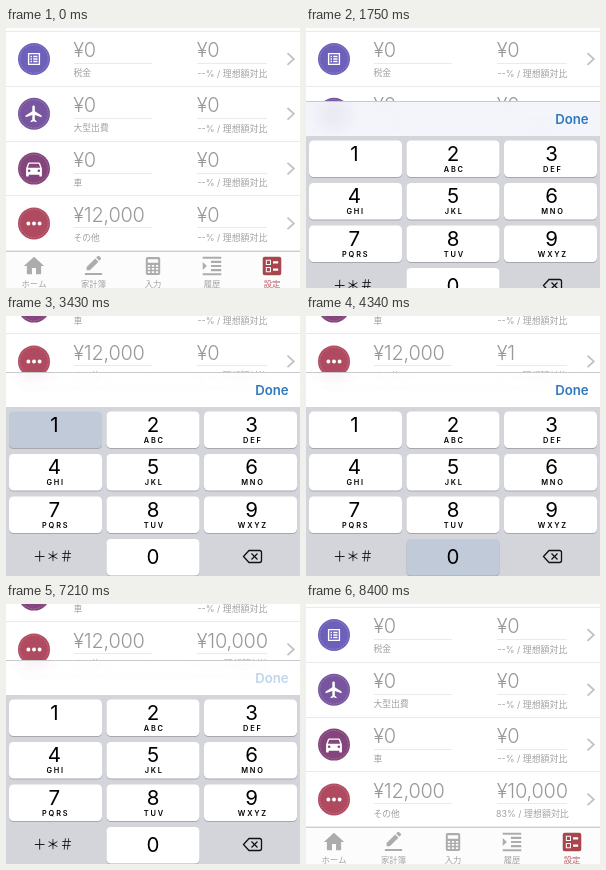
An HTML page with a canvas that plays this animation: 294x260 px, repeating every 9.24 s.

```html
<!DOCTYPE html>
<html lang="ja">
<head>
<meta charset="utf-8">
<title>Budget settings</title>
<style>
html, body { margin: 0; width: 100%; height: 100%; overflow: hidden; background: #fff; }
canvas { display: block; width: 294px; height: 260px; }
</style>
</head>
<body>
<canvas id="stage"></canvas>
<script>
const W = 294, H = 260, LOOP = 9240;
const PITCH = 54.8, SCROLL = 150, BAR_Y = 56, BAR_H = 35;
const SANS = 'Inter, "Noto Sans CJK JP", sans-serif';
const GREY = '#999', PALE = '#a2a2a2', RULE = '#eaeaea', RED = '#a8454d';

const canvas = document.getElementById('stage');
const dpr = window.devicePixelRatio || 1;
canvas.width = W * dpr;
canvas.height = H * dpr;
const ctx = canvas.getContext('2d');

// Glyphs on a 24-unit grid
const GLYPH = {
  list: 'M4 4h16v16H4zM5.8 5.8v12.4h12.4V5.8zM7.4 7.6h2v2h-2zM11 7.6h5.6v2H11zM7.4 11h2v2h-2zM11 11h5.6v2H11zM7.4 14.4h2v2h-2zM11 14.4h5.6v2H11z',
  plane: 'M21 16v-2l-8-5V3.5C13 2.67 12.33 2 11.5 2S10 2.67 10 3.5V9l-8 5v2l8-2.5V19l-2 1.5V22l3.5-1 3.5 1v-1.5L13 19v-5.5z',
  car: 'M18.9 6Q18.5 5 17.5 5h-11Q5.5 5 5.1 6L3 12v8q0 1 1 1h1q1 0 1-1v-1h12v1q0 1 1 1h1q1 0 1-1v-8zM5 14.5a1.5 1.5 0 1 0 3 0a1.5 1.5 0 1 0-3 0zM16 14.5a1.5 1.5 0 1 0 3 0a1.5 1.5 0 1 0-3 0zM5 11l1.5-4.5h11L19 11z',
  dots: 'M3.2 12a2.3 2.3 0 1 0 4.6 0a2.3 2.3 0 1 0-4.6 0zM9.7 12a2.3 2.3 0 1 0 4.6 0a2.3 2.3 0 1 0-4.6 0zM16.2 12a2.3 2.3 0 1 0 4.6 0a2.3 2.3 0 1 0-4.6 0z',
  home: 'M10 20v-6h4v6h5v-8h3L12 3 2 12h3v8z',
  pencil: 'M17.75 7L14 3.25l-10 10V17h3.75zM20.7 4q.7-.7 0-1.4L18.4.3q-.7-.7-1.4 0L15 2.25 18.75 6zM2 20h20v2.6H2z',
  calc: 'M6 2h12q2 0 2 2v16q0 2-2 2H6q-2 0-2-2V4q0-2 2-2zM6.2 4.4v4h11.6v-4z' +
    [10.8, 14.3, 17.8].map(y => [6.2, 10.7, 15.2].map(x => `M${x} ${y}h2.6v2h-2.6z`).join('')).join(''),
  indent: 'M3 21h18v-2H3zM3 8v8l4-4zM11 17h10v-2H11zM3 3v2h18V3zM11 9h10V7H11zM11 13h10v-2H11z',
  ballot: 'M13 9.5h5v-2h-5zM13 16.5h5v-2h-5zM19 21H5a2 2 0 0 1-2-2V5a2 2 0 0 1 2-2h14a2 2 0 0 1 2 2v14a2 2 0 0 1-2 2zM6 11h5V6H6zM7 7h3v3H7zM6 18h5v-5H6zM7 14h3v3H7z'
};
for (const k in GLYPH) GLYPH[k] = new Path2D(GLYPH[k]);

const ROWS = [
  { label: '税金', sum: '¥0', icon: 'list', size: 0.76, color: '#6d60ba' },
  { label: '大型出費', sum: '¥0', icon: 'plane', size: 0.84, color: '#78569f' },
  { label: '車', sum: '¥0', icon: 'car', size: 0.88, color: '#84457c' },
  { label: 'その他', sum: '¥12,000', icon: 'dots', size: 0.86, color: '#b04a60' }
];
const TABS = [
  ['ホーム', 'home', 28, 1.02], ['家計簿', 'pencil', 87.5, 0.86], ['入力', 'calc', 147, 0.9],
  ['履歴', 'indent', 206, 1.03], ['設定', 'ballot', 266, 1.03]
];
const LETTERS = ['', 'ABC', 'DEF', 'GHI', 'JKL', 'MNO', 'PQRS', 'TUV', 'WXYZ'];

// Typed amounts and key presses: [start, value] and [from, to, key]
const AMOUNTS = [[0, '¥0'], [3570, '¥1'], [4480, '¥10'], [4690, '¥100'], [4970, '¥1,000'], [5390, '¥10,000']];
const PRESSES = [[3430, 3570, 1], [4340, 4480, 0], [4550, 4970, 0], [5250, 5390, 0]];
const OPEN = 1493, CLOSE = 7268, DONE_DOWN = 6930;

const clamp = v => Math.max(0, Math.min(1, v));
const smooth = (t, a, b) => { const p = clamp((t - a) / (b - a)); return p * p * (3 - 2 * p); };
const spring = ms => { const x = Math.max(0, ms) * 0.016; return 1 - (1 + x) * Math.exp(-x); };

function text(str, x, y, size, color, { weight = 400, align = 'left', gap = 0 } = {}) {
  ctx.font = `${weight} ${size}px ${SANS}`;
  ctx.letterSpacing = gap + 'px';
  ctx.textAlign = align;
  ctx.fillStyle = color;
  ctx.fillText(str, x, y);
}

function rect(x, y, w, h, color) {
  ctx.fillStyle = color;
  ctx.fillRect(x, y, w, h);
}

function glyph(name, x, y, scale, color) {
  ctx.save();
  ctx.translate(x, y);
  ctx.scale(scale, scale);
  ctx.translate(-12, -12);
  ctx.fillStyle = color;
  ctx.fill(GLYPH[name], 'evenodd');
  ctx.restore();
}

function stroke(points, color, width) {
  ctx.beginPath();
  points.forEach(([x, y]) => ctx.lineTo(x, y));
  ctx.strokeStyle = color;
  ctx.lineWidth = width;
  ctx.stroke();
}

function badge(row, y) {
  ctx.beginPath();
  ctx.arc(28, y, 16, 0, 7);
  ctx.fillStyle = row.color;
  ctx.fill();
  ctx.beginPath();
  ctx.arc(28, y, 14.2, 0, 7);
  ctx.setLineDash([1.6, 1.1]);
  ctx.strokeStyle = 'rgba(255,255,255,.28)';
  ctx.lineWidth = 0.8;
  ctx.stroke();
  ctx.setLineDash([]);
  glyph(row.icon, 28, y, row.size, '#fff');
}

function drawList(t, scroll) {
  rect(0, Math.round(3 - scroll), W, 1, RULE);
  ROWS.forEach((row, i) => {
    const y = i * PITCH - scroll;
    const last = i === 3;
    const ideal = last ? AMOUNTS.filter(a => a[0] <= t).pop()[1] : '¥0';
    const filled = last && t >= DONE_DOWN;
    const sum = { weight: 300, gap: -0.25 };
    badge(row, y + 31);
    text(row.sum, 67.3, y + 29.3, 20, GREY, sum);
    text(ideal, 190.8, y + 29.3, 20, GREY, sum);
    const line = Math.round(y + 35);
    rect(68, line, 78, 1, RULE);
    rect(191, line, 70, 1, RULE);
    text(row.label, 67.5, y + 48.2, 8.8, PALE);
    text((filled ? '83' : '--') + '% / 理想額対比', filled ? 190 : 191.5, y + 48.8, 8.95, PALE);
    stroke([[281.5, y + 25.2], [287.8, y + 31], [281.5, y + 36.8]], '#c2c2c2', 1.8);
    rect(0, Math.round(y + 57.8), W, 1, RULE);
  });
}

function drawTabs() {
  rect(0, 223, W, 37, '#fcfcfc');
  rect(0, 223, W, 1, '#cfcfcf');
  TABS.forEach(([label, icon, x, scale], i) => {
    const on = i === 4;
    glyph(icon, x, 238, scale, on ? RED : '#acacac');
    text(label, x, 258.5, 8.3, on ? '#b8606a' : PALE, { align: 'center' });
  });
}

function key(x, y, color) {
  ctx.beginPath();
  ctx.roundRect(x, y + 1, 93, 36.5, 4.5);
  ctx.fillStyle = '#a6a8ae';
  ctx.fill();
  ctx.beginPath();
  ctx.roundRect(x, y, 93, 36.5, 4.5);
  ctx.fillStyle = color;
  ctx.fill();
}

function drawKeys(t) {
  const held = PRESSES.find(p => t >= p[0] && t < p[1]);
  const fill = n => held && held[2] === n ? '#c1cad9' : '#fff';
  const mid = { align: 'center' };
  rect(0, BAR_Y + BAR_H, W, H, '#d3d5db');
  LETTERS.forEach((letters, i) => {
    const col = i % 3, y = 95.5 + Math.floor(i / 3) * 42.5;
    const center = 48.4 + col * 98.6;
    key(3 + col * 97.5, y, fill(i + 1));
    text(String(i + 1), center, y + 20.3, 20.5, '#000', mid);
    text(letters, center + 1.3, y + 31.3, 7.4, '#000', { align: 'center', weight: 600, gap: 1.8 });
  });
  key(100.5, 223, fill(0));
  text('0', 147, 248.4, 20.5, '#000', mid);
  text('＋＊＃', 47, 245, 13.4, '#111', mid);
  ctx.beginPath();
  ctx.moveTo(237.5, 240.5);
  ctx.lineTo(243, 234.5);
  ctx.lineTo(253.5, 234.5);
  ctx.quadraticCurveTo(255.5, 234.5, 255.5, 236.5);
  ctx.lineTo(255.5, 244.5);
  ctx.quadraticCurveTo(255.5, 246.5, 253.5, 246.5);
  ctx.lineTo(243, 246.5);
  ctx.closePath();
  ctx.strokeStyle = '#111';
  ctx.lineWidth = 1.3;
  ctx.stroke();
  stroke([[245.5, 237.5], [251.5, 243.5]], '#111', 1.3);
  stroke([[251.5, 237.5], [245.5, 243.5]], '#111', 1.3);
}

function drawKeyboard(t, drop, page) {
  // Translucent toolbar: the page shows through, blurred
  const top = BAR_Y + drop;
  ctx.save();
  ctx.beginPath();
  ctx.rect(0, top, W, BAR_H);
  ctx.clip();
  rect(0, top, W, BAR_H, '#fff');
  ctx.filter = `blur(${8 * dpr}px)`;
  ctx.globalAlpha = 0.12;
  page();
  ctx.restore();
  if (t < CLOSE) rect(0, top, W, BAR_H, `rgba(225,229,242,${0.4 * clamp(drop / 17)})`);

  ctx.save();
  ctx.translate(0, drop);
  rect(0, BAR_Y, W, 1, '#c8cacd');
  ctx.globalAlpha = t < DONE_DOWN ? 1 : 0.3 + 0.7 * clamp((t - CLOSE) / 400);
  text('Done', 249.2, 78.8, 13.2, '#2e78c0', { weight: 600 });
  ctx.globalAlpha = 1;
  drawKeys(t);
  ctx.restore();
}

function draw(t) {
  const scroll = SCROLL * (smooth(t, 1780, 2130) - smooth(t, 7285, 7625));
  const shown = spring(t - OPEN) - spring(t - CLOSE);
  const drop = Math.round((H - BAR_Y) * (1 - shown));
  const page = () => { drawList(t, scroll); drawTabs(); };
  ctx.setTransform(dpr, 0, 0, dpr, 0, 0);
  rect(0, 0, W, H, '#fff');
  page();
  if (drop < H - BAR_Y) drawKeyboard(t, drop, page);
}

function tick() {
  draw(performance.now() % LOOP);
  requestAnimationFrame(tick);
}
tick();
</script>
</body>
</html>
```
